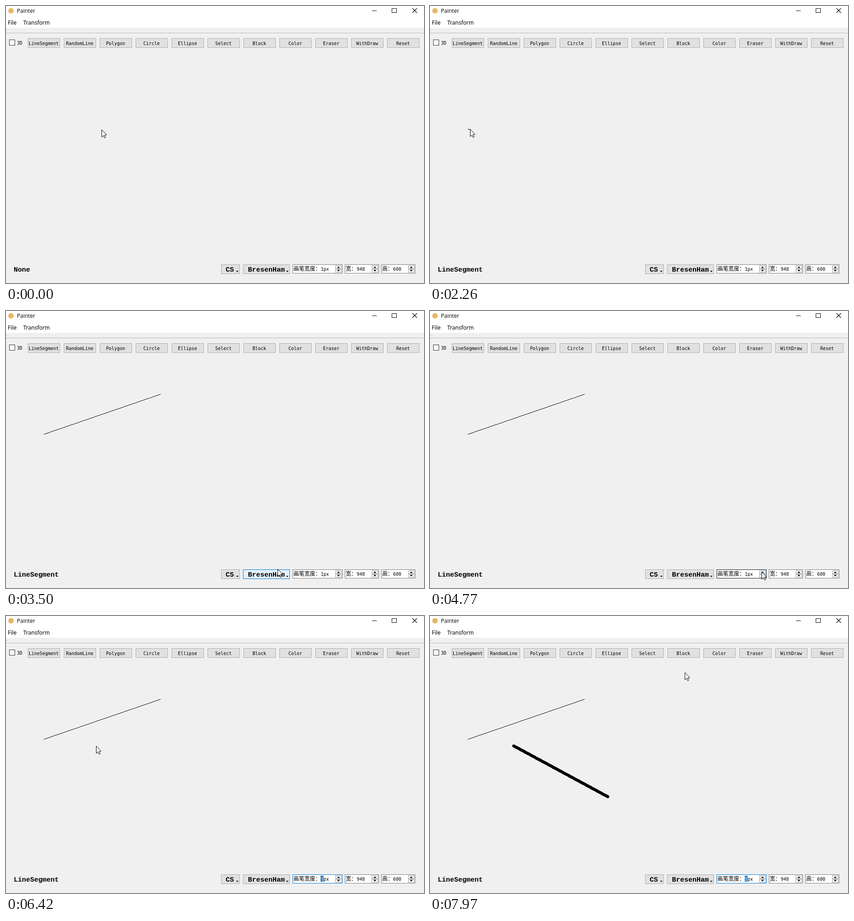
Write an HTML page with a canvas that moves like this. It is 919x610 px and loops after 7990 ms.

```html
<!DOCTYPE html>
<html lang="en">
<head>
<meta charset="utf-8">
<title>Painter</title>
<style>
  html, body { margin: 0; width: 100%; height: 100%; overflow: hidden; background: #f0f0f0; }
  canvas { display: block; }
</style>
</head>
<body>
<canvas id="stage" width="919" height="610"></canvas>
<script>
const g = document.getElementById('stage').getContext('2d');
const LOOP = 7990;

const TITLE = '12px "Open Sans", "Noto Sans", sans-serif';
const MENU = '12px "Noto Sans", "Open Sans", sans-serif';
const SMALL = '10px "DejaVu Sans Mono", "Liberation Mono", monospace';
const BIG = 'bold 15px "Liberation Mono", "DejaVu Sans Mono", monospace';
const CJK = '12px "Noto Sans CJK SC", "Noto Sans CJK JP", "Noto Sans CJK", sans-serif';

const NORMAL = { fill: [225, 225, 225], edge: [173, 173, 173] };
const HOVER = { fill: [229, 241, 251], edge: [0, 120, 215] };
const PRESSED = { fill: [204, 228, 247], edge: [0, 84, 153] };

const TOOLS = ['LineSegment', 'RandomLine', 'Polygon', 'Circle', 'Ellipse', 'Select',
  'Block', 'Color', 'Eraser', 'WithDraw', 'Reset'];

// Pointer path: time, x, y
const PATH = [
  [330, 210, 272], [1050, 87, 91], [1600, 87, 91], [2100, 83, 271],
  [2259, 83, 271], [2260, 88, 271], [2820, 339, 183],
  [3080, 339, 183], [3500, 597, 568], [3600, 597, 568], [3810, 613, 571],
  [3970, 613, 571], [4700, 729, 575], [4769, 729, 575], [4770, 729, 574],
  [5900, 729, 574], [6420, 198, 286], [6450, 198, 286], [6660, 184, 286],
  [6700, 184, 286], [7250, 391, 398], [7410, 391, 398], [7970, 560, 124]
];

const clamp = v => Math.max(0, Math.min(1, v));
const ramp = (t, a, b) => clamp((t - a) / (b - a));
const smooth = u => u * u * (3 - 2 * u);
const mix = (a, b, u) => a.map((v, i) => v + (b[i] - v) * u);
const rgb = c => `rgb(${c.map(Math.round).join()})`;
const blend = (a, b, u) => ({ fill: mix(a.fill, b.fill, u), edge: mix(a.edge, b.edge, u) });

function pointer(t) {
  const i = PATH.findIndex(k => k[0] > t);
  if (i === 0) return PATH[0].slice(1);
  if (i < 0) return PATH[PATH.length - 1].slice(1);
  const [ta, ...a] = PATH[i - 1], [tb, ...b] = PATH[i];
  return mix(a, b, smooth(ramp(t, ta, tb))).map(Math.round);
}

function rect(x, y, w, h, color) {
  g.fillStyle = color;
  g.fillRect(x, y, w, h);
}

function box(x, y, w, h, fill, edge) {
  rect(x, y, w, h, edge);
  rect(x + 1, y + 1, w - 2, h - 2, fill);
}

function text(str, x, y, font, color = '#000', align = 'left') {
  g.font = font;
  g.fillStyle = color;
  g.textAlign = align;
  g.fillText(str, x, y);
}

function poly(points, fill, stroke) {
  g.beginPath();
  points.forEach(([x, y]) => g.lineTo(x, y));
  g.closePath();
  if (fill) { g.fillStyle = fill; g.fill(); }
  if (stroke) { g.strokeStyle = stroke; g.lineWidth = 1; g.stroke(); }
}

// Bresenham line, plotted with a callback
function plotLine([x, y], [x1, y1], plot) {
  const dx = Math.abs(x1 - x), dy = -Math.abs(y1 - y);
  const sx = Math.sign(x1 - x), sy = Math.sign(y1 - y);
  let err = dx + dy;
  for (;;) {
    plot(x, y);
    if (x === x1 && y === y1) return;
    const e = 2 * err;
    if (e >= dy) { err += dy; x += sx; }
    if (e <= dx) { err += dx; y += sy; }
  }
}

const thin = (x, y) => g.fillRect(x, y, 1, 1);
const thick = (x, y) => {
  g.fillRect(x - 3, y - 2, 6, 4);
  g.fillRect(x - 2, y - 3, 4, 6);
};

function drawWindow() {
  rect(0, 0, 919, 610, '#f0f0f0');
  rect(0, 0, 919, 48, '#fff');
  rect(0, 59, 919, 1, '#b8b8b8');
  rect(0, 53, 2, 1, '#a0a0a0');

  g.fillStyle = '#e6b566';
  g.beginPath();
  g.arc(11, 10.5, 6, 0, 7);
  g.fill();

  text('Painter', 24, 15, TITLE);
  text('File', 4, 41, MENU);
  text('Transform', 38, 41, MENU);

  rect(805, 10, 10, 1, '#000');
  box(848, 5, 11, 10, '#fff', '#000');
  g.strokeStyle = '#000';
  g.lineWidth = 1.1;
  g.beginPath();
  g.moveTo(893.5, 5); g.lineTo(903.5, 15);
  g.moveTo(903.5, 5); g.lineTo(893.5, 15);
  g.stroke();

  box(7, 74, 13, 13, '#fff', '#333');
  text('3D', 24, 85, SMALL);
}

function toolStyle(t) {
  if (t >= 1520 && t < 1600) return PRESSED;
  return blend(NORMAL, HOVER, t < 1600 ? ramp(t, 1000, 1200) : 1 - ramp(t, 1660, 1900));
}

function drawTools(t) {
  TOOLS.forEach((name, i) => {
    const x = 48 + 79 * i, s = i ? NORMAL : toolStyle(t);
    box(x, 71, 71, 21, rgb(s.fill), rgb(s.edge));
    text(name, x + 35, 86, SMALL, '#000', 'center');
  });
}

function drawMenuButton(x, w, label, s) {
  box(x, 569, w, 21, rgb(s.fill), rgb(s.edge));
  text(label, x + (w < 60 ? 10 : 11), 585, BIG);
  const r = x + w;
  poly([[r - 8, 583], [r - 3, 583], [r - 5.5, 586]], '#000');
}

function drawSpin(x, w, label, value, o = {}) {
  box(x, 569, w, 20, '#fff', o.edge || '#7a7a7a');
  const bx = x + w - 16, cx = bx + 7;
  const up = o.up || { fill: [240, 240, 240], edge: [172, 172, 172] };
  box(bx, 571, 14, 8, rgb(up.fill), rgb(up.edge));
  box(bx, 579, 14, 8, '#f0f0f0', '#acacac');
  poly([[cx - 3, 577], [cx + 3, 577], [cx, 573.5]], '#000');
  poly([[cx - 3, 581], [cx + 3, 581], [cx, 584.5]], '#000');

  text(label, x + 2, 583, CJK);
  const vx = x + 2 + 12 * label.length;
  if (o.selected) {
    rect(vx, 572, 6, 13, '#0078d7');
    text(value[0], vx, 583, SMALL, '#fff');
    text(value.slice(1), vx + 6, 583, SMALL);
    if (o.caret) rect(vx, 572, 1, 13, '#000');
  } else {
    text(value, vx, 583, SMALL);
  }
}

function drawStatus(t, [px, py]) {
  text(t < 1600 ? 'None' : 'LineSegment', 17, 585, BIG);
  drawMenuButton(473, 41, 'CS', NORMAL);
  const glow = t < 4000 ? ramp(t, 3390, 3480) : 1 - ramp(t, 4130, 4330);
  drawMenuButton(521, 103, 'BresenHam', blend(NORMAL, HOVER, glow));

  const size = 1 + [4880, 5140, 5400, 5620].filter(c => t >= c).length;
  const focus = size > 1;
  const over = px >= 630 && px < 740 && py >= 569 && py < 589;
  drawSpin(630, 110, '画笔宽度：', size + 'px', {
    edge: over ? '#171717' : focus ? '#0078d7' : '#7a7a7a',
    up: over && px >= 724 ? { fill: HOVER.fill, edge: [126, 180, 234] } : null,
    selected: focus,
    caret: Math.floor((t - 4950) / 530) % 2 === 0
  });
  drawSpin(745, 75, '宽：', '948');
  drawSpin(825, 75, '高：', '600');
}

function drawStrokes(t, tip) {
  g.fillStyle = '#000';
  if (t >= 2260) plotLine([83, 271], t < 2820 ? tip : [339, 183], thin);
  if (t >= 6660) plotLine([184, 286], t < 7250 ? tip : [391, 398], thick);
}

function drawPointer([x, y]) {
  const shape = [[0, 0], [0, 16], [3.6, 12.7], [6, 18], [8.4, 17], [6.1, 11.7], [10.7, 11.3]];
  poly(shape.map(([a, b]) => [x + a + .5, y + b + .5]), '#fff', '#000');
}

function frame(now) {
  const t = now % LOOP, tip = pointer(t);
  drawWindow();
  drawTools(t);
  drawStatus(t, tip);
  drawStrokes(t, tip);
  drawPointer(tip);
  requestAnimationFrame(() => frame(performance.now() - start));
}

const start = performance.now();
frame(0);
</script>
</body>
</html>
```
